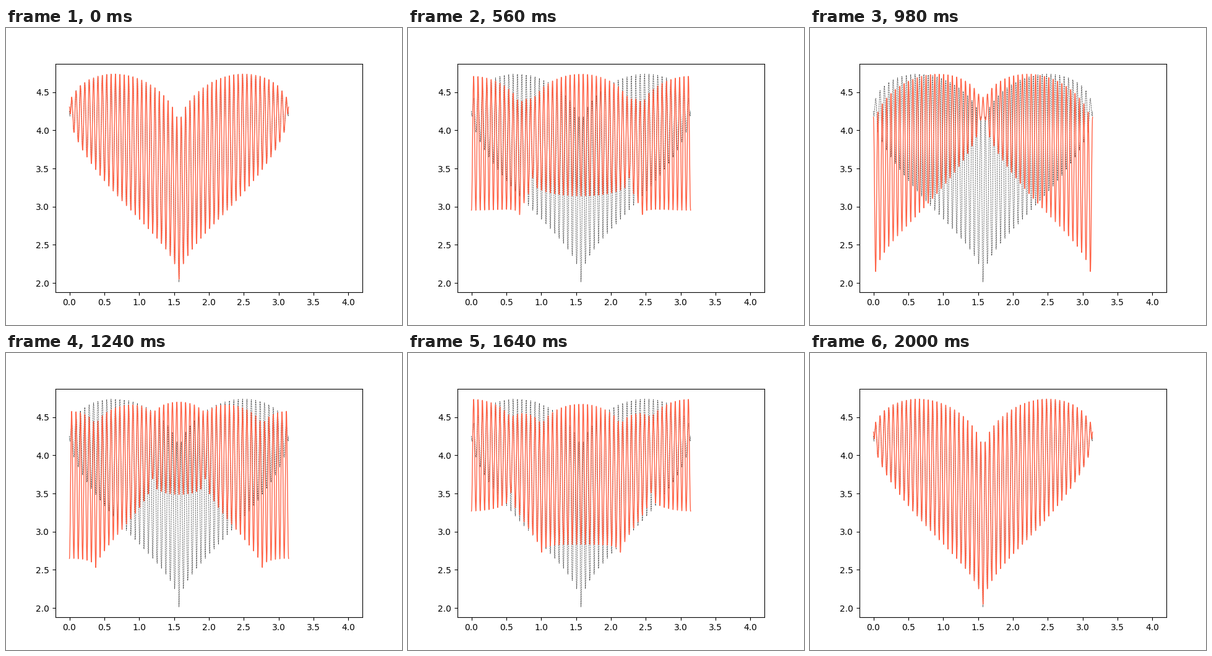
Write a matplotlib script that moves like this. It is 640x480 px and loops after 2020 ms.

```python
import numpy as np
import matplotlib.pyplot as plt
from matplotlib.animation import FuncAnimation

FRAMES = 101
MODES = 250
SAMPLES = 10000


def heart(x):
    arch = np.sqrt(np.clip(np.sin(x), 0, None))
    return 3 + np.sqrt(np.abs(x - np.pi / 2)) - arch * np.cos(100 * x)


# Cosine series of the heart on a string with free ends
modes = np.arange(0, MODES + 1, 2)
grid = np.linspace(0, np.pi, SAMPLES)
coef = np.cos(np.outer(modes, grid)) @ heart(grid) * 2 / SAMPLES
coef[0] /= 2

x = np.append(np.arange(0, np.pi, 0.001), np.pi)
basis = np.cos(np.outer(x, modes))


def wave(t):
    return basis @ (coef * np.cos(modes * t))


fig, ax = plt.subplots(figsize=(6.4, 4.8), dpi=100)
ax.plot(x, heart(x), "--", color="black", lw=0.5, alpha=0.8)
string, = ax.plot(x, wave(0), color="tomato", lw=1)
ax.set_xlim(-0.2, 4.2)


def update(i):
    string.set_ydata(wave(np.pi * i / (FRAMES - 1)))
    return string,


anim = FuncAnimation(fig, update, frames=FRAMES, interval=20,
                     repeat=True, repeat_delay=0)
plt.show()
```
